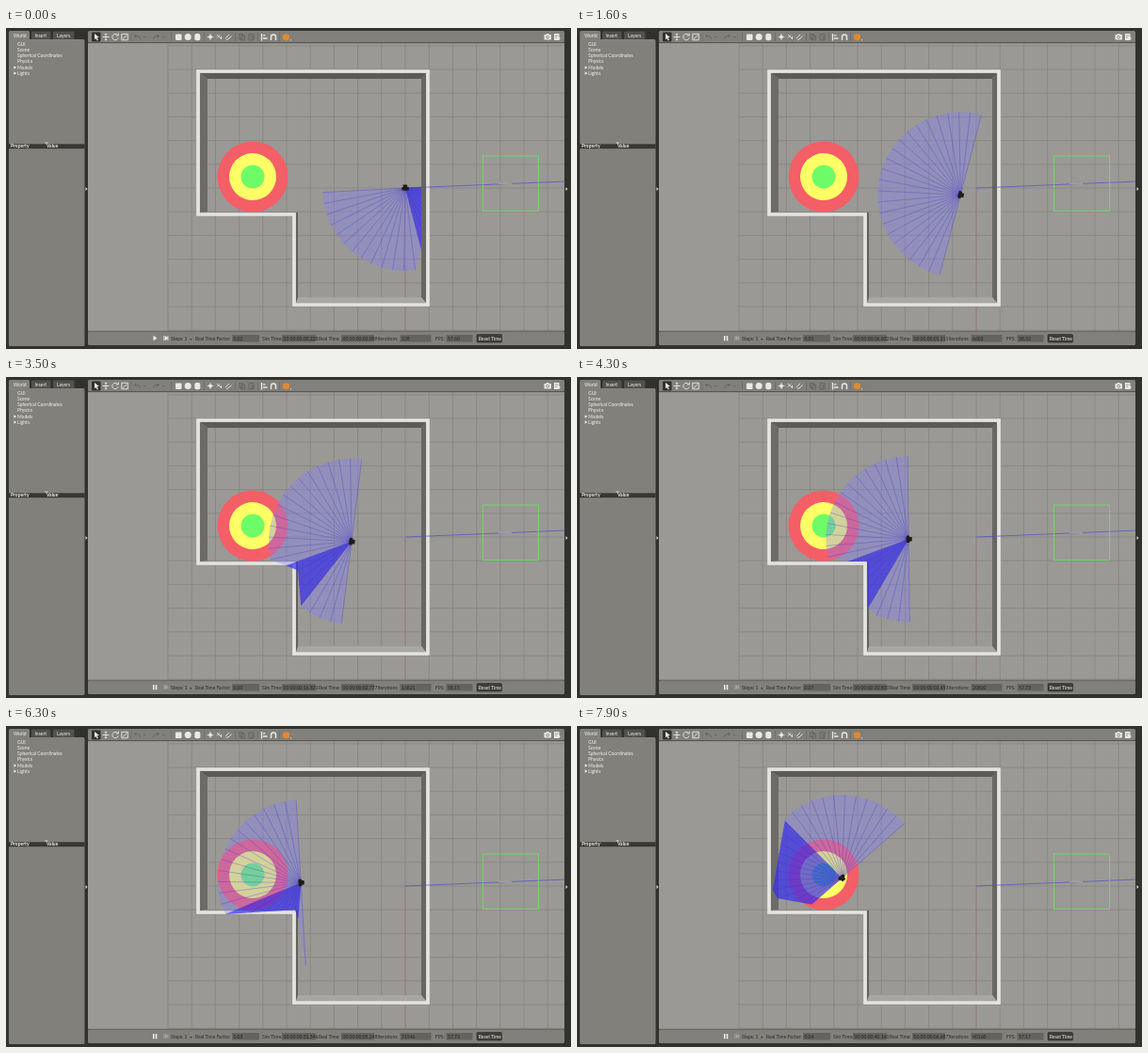
Animation, 600 px wide and 341 px high, one loop 8000 ms. Source, as an HTML page:

```html
<!DOCTYPE html>
<html lang="en">
<head>
<meta charset="utf-8">
<title>Robot simulation</title>
<style>
html, body { margin: 0; width: 100%; height: 100%; overflow: hidden; background: #33312e; }
svg { display: block; width: 100%; height: 100%; }
text { font: 5px Lato, "Open Sans", sans-serif; fill: #f2f1ee; }
.bar text { fill: #2b2a27; }
.bar text.value { fill: #23221f; }
.bar text.button { fill: #f2f1ee; }
.bold { font-weight: 700; }
.icons { fill: none; stroke: #e9e8e4; stroke-width: .9; }
.icons .solid { fill: #e9e8e4; stroke: none; }
.icons .off { stroke: #65635f; }
</style>
</head>
<body>
<svg viewBox="0 0 600 341" preserveAspectRatio="none">
  <defs>
    <clipPath id="view"><rect x="87" y="16" width="506" height="306"/></clipPath>
  </defs>
  <rect width="600" height="341" fill="#33312e"/>

  <!-- side panel -->
  <path d="M27 12V5q0-1.500 1.500-1.500H46q1.500 0 1.500 1.500V12ZM50 12V5q0-1.500 1.500-1.500H71q1.500 0 1.500 1.500V12Z" fill="#53514d"/>
  <path d="M3 12V4.500Q3 3 4.500 3H23.500Q25 3 25 4.500V12H82Q83.500 12 83.500 13.500V336.500Q83.500 338 82 338H4.500Q3 338 3 336.500Z" fill="#82807b"/>
  <text x="8" y="9.500">World</text>
  <text x="30.500" y="9.500">Insert</text>
  <text x="54" y="9.500">Layers</text>
  <g id="tree"></g>
  <path d="M8.500 40.300l2.500 1.700-2.500 1.700ZM8.500 46.300l2.500 1.700-2.500 1.700Z" fill="#f2f1ee"/>
  <rect x="3" y="123.300" width="80.500" height="4.900" fill="#393733"/>
  <rect x="41.500" y="121.500" width="3" height="1" fill="#e5e3df"/>
  <text class="bold" x="5" y="127.400">Property</text>
  <text class="bold" x="43" y="127.400">Value</text>
  <path d="M84.500 169v4l2-2ZM594.500 169v4l2-2Z" fill="#dddbd6"/>

  <!-- 3D view -->
  <g clip-path="url(#view)">
    <rect x="87" y="16" width="506" height="306" fill="#9b9995"/>
    <path id="grid" fill="none" stroke="#85837f" stroke-width=".7"/>
    <path d="M424 170V322" stroke="#a07874" stroke-width=".6"/>
    <path d="M206 48H446L441 54H214Z" fill="#5d5b58"/>
    <path d="M206 48L214 54V195L206 196Z" fill="#6d6b68"/>
    <path d="M446 48L441 54V286L446 292Z" fill="#686663"/>
    <path d="M308 292L310 286H441L446 292Z" fill="#a9a7a3"/>
    <path d="M308 196H310V286L308 292Z" fill="#62605d"/>
    <path d="M204 46H448V294H306V198H204Z" fill="none" stroke="#e4e4e1" stroke-width="3.700"/>
    <g>
      <circle cx="262" cy="158" r="37.500" fill="#f45e67"/>
      <circle cx="262" cy="158" r="25" fill="#ffff66"/>
      <circle cx="262" cy="158" r="12.500" fill="#6dfc68"/>
    </g>
    <path d="M424 170L594 163" stroke="#4a48d2" stroke-width=".65"/>
    <path d="M523 165.300H537" stroke="#b5b7b0" stroke-width=".8"/>
    <rect x="506.500" y="136" width="59" height="58.500" fill="none" stroke="#70de66" stroke-width=".8"/>
    <path id="free" fill="rgb(128,125,255)" fill-opacity=".35"/>
    <path id="blocked" fill="rgb(55,45,240)" fill-opacity=".7"/>
    <path id="rays" fill="none" stroke="#3a30c8" stroke-opacity=".6" stroke-width=".5"/>
    <g id="robot" fill="#1c1c1c">
      <rect x="-3.500" y="-2.200" width="6" height="4.400"/>
      <rect x="-1" y="-3.700" width="3.400" height="7.400"/>
    </g>
  </g>

  <!-- toolbar -->
  <rect x="87" y="3" width="506" height="12.500" rx="1.500" fill="#82807b"/>
  <path d="M87 15.700H593" stroke="#5a5854" stroke-width=".8"/>
  <g class="icons">
    <rect x="91" y="4.500" width="9.500" height="10" rx="1" fill="#33312e" stroke="none"/>
    <path class="solid" d="M94 6l5 4-2.300.300 1.200 2.500-1.200.600-1.200-2.500-1.500 1.400Z"/>
    <path d="M102.500 9.500h7M106 6v7M104.800 7l1.200-1.200L107.200 7M104.800 12l1.200 1.200 1.200-1.200"/>
    <path d="M118.500 7.500a3.200 3.200 0 1 0 .600 3M119.300 5.500v2.500h-2.500"/>
    <path d="M122.800 6.300h6.500v6.500h-6.500ZM124 11.800l4.200-4.300"/>
    <path class="off" d="M142.500 12q0-4-5.500-3.500M138.500 6.700l-2 1.800 2 1.800M146 9.500h2.500M156.500 12q0-4 5.500-3.500M160.500 6.700l2 1.800-2 1.800M166 9.500h2.500"/>
    <path d="M133 5v9M175.500 5v9M210.500 5v9M243.500 5v9M267.500 5v9M290.500 5v9" stroke="#65635f" stroke-width=".6"/>
    <rect class="solid" x="180" y="6.500" width="6.500" height="6.500" rx="1"/>
    <circle class="solid" cx="193.200" cy="9.600" r="3.500"/>
    <rect class="solid" x="200.300" y="6" width="6" height="7.200" rx="2"/>
    <circle class="solid" cx="217" cy="9.500" r="1.900"/>
    <path d="M217 6v7M213.500 9.500h7" stroke-width=".7"/>
    <path d="M224 7l4 4M227 7.500l-3 3M228.500 9v3"/>
    <path d="M233 11l4-4M235.500 12.500l4-4M234 12.800l1.500-1.500"/>
    <path class="off" d="M247.500 6.500h4v5h-4ZM249.500 8h4v5h-4ZM258 6.500h5v6.500h-5ZM259.500 9h2.500v3h-2.500"/>
    <path d="M271.500 6v7.500M273 7.800h2.500M273 11h4.500" stroke-width="1.300"/>
    <path d="M281.500 13v-3.500a2.500 2.500 0 0 1 5 0V13" stroke-width="1.400"/>
    <path d="M294 7.500l3.500-1.500 3.500 1.500v4.500l-3.500 1.500-3.500-1.500Z" fill="#e2882f" stroke="none"/>
    <path d="M302.500 12v1.500" stroke-width=".7"/>
    <path class="solid" d="M571.500 7h2l.700-1h2l.700 1h2v5.500h-7.400Z"/>
    <circle cx="575.200" cy="9.700" r="1.400" stroke="#82807b"/>
    <rect class="solid" x="582" y="6" width="5.500" height="7"/>
    <path d="M583 8h3.500M583 10h2" stroke="#82807b" stroke-width=".7"/>
    <circle class="solid" cx="587" cy="11" r="1.500"/>
  </g>

  <!-- status bar -->
  <g class="bar">
    <rect x="87" y="322" width="506" height="15" rx="1.500" fill="#82807b"/>
    <path d="M87 322.200H593" stroke="#5a5854" stroke-width=".8"/>
    <path id="play" d="M156.500 326.800l4 2.700-4 2.700Z" fill="#f0efec"/>
    <path id="pause" d="M156 327h1.500v5.300H156ZM158.800 327h1.500v5.300h-1.500Z" fill="#f0efec"/>
    <path id="step" d="M167.500 327h1v5h-1ZM169 327l3 2.500-3 2.500ZM171.500 327h.800v5h-.800Z" fill="#f0efec"/>
    <path d="M195 330.300l1.300 1.500 1.300-1.500Z" fill="#2b2a27"/>
    <g id="status"></g>
    <rect x="500" y="325.500" width="26.500" height="8.500" rx="1" fill="#3f3d39" stroke="#2b2926" stroke-width=".6"/>
    <text class="button" x="501.800" y="331.600">Reset Time</text>
  </g>
</svg>
<script>
const LOOP = 8000, STEP = 100, RANGE = 88, SEGMENTS = 23, SCAN_DELAY = 120;
const byId = id => document.getElementById(id);

function addText(parent, x, y, content, className = "") {
  const node = document.createElementNS("http://www.w3.org/2000/svg", "text");
  node.setAttribute("x", x);
  node.setAttribute("y", y);
  node.setAttribute("class", className);
  node.textContent = content;
  parent.append(node);
  return node;
}

["GUI", "Scene", "Spherical Coordinates", "Physics", "Models", "Lights"]
  .forEach((name, i) => addText(byId("tree"), 12, 19 + i * 6.15, name));

let gridPath = "";
for (let i = -10; i <= 10; i++) {
  const d = i * 25.2;
  gridPath += `M${424 + d} -82V422M172 ${170 + d}H676`;
}
byId("grid").setAttribute("d", gridPath);

// Status fields: label, label x, value x, box width
const fields = {};
addText(byId("status"), 175, 331.5, "Steps: 1");
[["factor", "Real Time Factor:", 201, 241.5, 29],
 ["sim", "Sim Time:", 272, 294.5, 36],
 ["real", "Real Time:", 332, 357.5, 35],
 ["iterations", "Iterations:", 394.5, 420, 33],
 ["fps", "FPS:", 456, 469, 28]].forEach(([key, label, x, valueX, width]) => {
  const box = document.createElementNS("http://www.w3.org/2000/svg", "rect");
  Object.entries({ x: valueX - 1.5, y: 326, width, height: 7.5, fill: "#65635f" })
    .forEach(([name, value]) => box.setAttribute(name, value));
  byId("status").append(box);
  addText(byId("status"), x, 331.5, label);
  fields[key] = addText(byId("status"), valueX, 331.5, "", "value");
});

// time, x, y, heading in degrees
const poses = [
  [0, 424, 170, 87], [400, 424, 170, 87], [800, 421.5, 174.5, 130], [1200, 415, 177, 168],
  [1600, 407.3, 177.3, 194.6], [2200, 394, 177.6, 190], [2800, 381.2, 177.5, 215.5],
  [3500, 367, 174.8, 187], [4300, 352.2, 172.3, 179.3], [5500, 328.2, 168.4, 201.6],
  [6300, 313.2, 166.4, 176.7], [7300, 293, 163.3, 179], [7900, 281.4, 161.4, 229]
];
// time, simulated seconds, real seconds
const clocks = [
  [0, .228, .009], [399, .228, .009], [1600, 6.602, 1.111], [2800, 13.34, 2.186],
  [4300, 20.8, 3.453], [5500, 27.324, 4.536], [6300, 31.546, 5.248], [7900, 40.16, 6.687]
];
// time, real time factor, frames per second
const rates = [
  [0, "0.02", "57.60"], [1200, "0.01", "58.32"], [2500, "0.00", "58.15"],
  [3900, "0.07", "57.73"], [5300, "0.03", "57.73"], [7000, "0.04", "57.17"]
];

function sample(keys, t) {
  const next = Math.max(1, keys.findIndex(key => key[0] >= t));
  const a = keys[next - 1], b = keys[next];
  const k = (t - a[0]) / (b[0] - a[0]);
  return a.slice(1).map((value, i) => value + (b[i + 1] - value) * k);
}

const room = [[213.5, 54], [441, 54], [441, 286], [310, 286], [310, 195], [213.5, 195]];

function castRay(x, y, angle) {
  const dx = Math.cos(angle), dy = Math.sin(angle);
  let distance = RANGE;
  room.forEach(([ax, ay], i) => {
    const [bx, by] = room[(i + 1) % room.length];
    const ex = bx - ax, ey = by - ay, det = dx * ey - dy * ex;
    if (Math.abs(det) < 1e-9) return;
    const along = ((ax - x) * ey - (ay - y) * ex) / det;
    const across = ((ax - x) * dy - (ay - y) * dx) / det;
    if (along > 0 && across >= 0 && across <= 1) distance = Math.min(distance, along);
  });
  return distance;
}

// Distances come from a slightly older pose, but are shown from the current one.
function drawScan([x, y, heading], [scanX, scanY, scanHeading]) {
  const beams = Array.from({ length: SEGMENTS + 1 }, (_, i) => {
    const offset = i * 180 / SEGMENTS - 90;
    const distance = castRay(scanX, scanY, (scanHeading + offset) * Math.PI / 180);
    const angle = (heading + offset) * Math.PI / 180;
    const point = [x + Math.cos(angle) * distance, y + Math.sin(angle) * distance]
      .map(v => v.toFixed(2)).join(" ");
    return { point, hit: distance < RANGE };
  });
  let free = "", blocked = "", lines = "";
  beams.forEach((beam, i) => {
    lines += `M${x} ${y}L${beam.point}`;
    if (!i) return;
    const last = beams[i - 1];
    const slice = `M${x} ${y}L${last.point}L${beam.point}Z`;
    if (last.hit && beam.hit) blocked += slice;
    else free += slice;
  });
  byId("free").setAttribute("d", free);
  byId("blocked").setAttribute("d", blocked);
  byId("rays").setAttribute("d", lines);
  byId("robot").setAttribute("transform", `translate(${x} ${y}) rotate(${heading})`);
}

const clockText = seconds => "00 00:00:" + seconds.toFixed(3).padStart(6, "0");

function draw(t) {
  drawScan(sample(poses, t), sample(poses, Math.max(0, t - SCAN_DELAY)));

  const [sim, real] = sample(clocks, t);
  const [, factor, fps] = rates.filter(rate => rate[0] <= t).pop();
  fields.factor.textContent = factor;
  fields.sim.textContent = clockText(sim);
  fields.real.textContent = clockText(real);
  fields.iterations.textContent = Math.round(sim * 1000);
  fields.fps.textContent = fps;

  const running = t >= 400;
  byId("play").setAttribute("visibility", running ? "hidden" : "visible");
  byId("pause").setAttribute("visibility", running ? "visible" : "hidden");
  byId("step").setAttribute("opacity", running ? .35 : 1);
}

const start = performance.now();
function tick() {
  const t = (performance.now() - start) % LOOP;
  draw(Math.floor(t / STEP) * STEP);
  requestAnimationFrame(tick);
}
tick();
</script>
</body>
</html>
```
